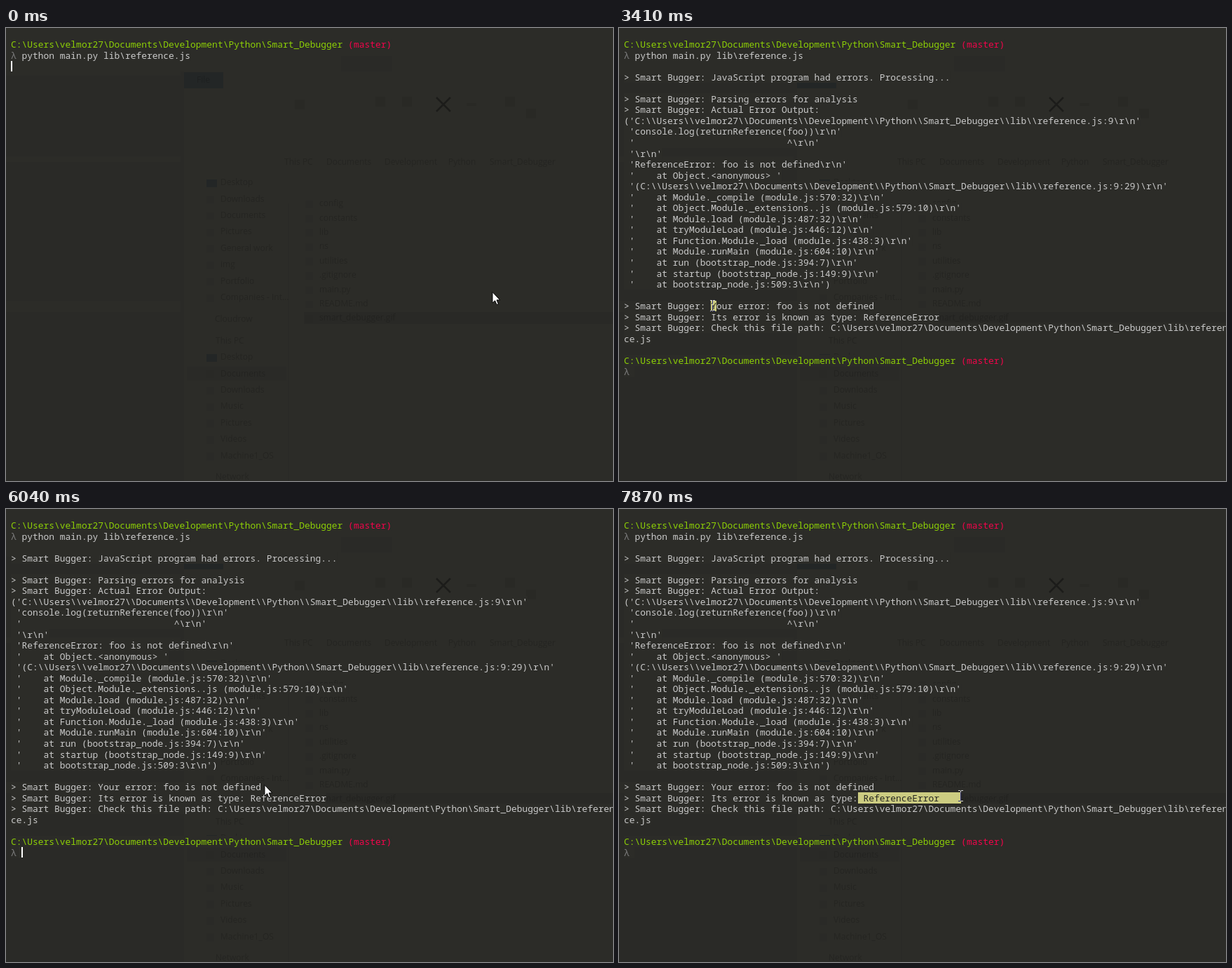
Recreate the animation shown at these times as an HTML page with a canvas. Size 866x646 px, loop 8 s.

```html
<!DOCTYPE html>
<html lang="en">
<head>
<meta charset="utf-8">
<title>Terminal session</title>
<style>
html, body { margin: 0; width: 100%; height: 100%; overflow: hidden; background: #2c2c28; }
canvas { display: block; }
</style>
</head>
<body>
<canvas id="stage" width="866" height="646"></canvas>
<script>
const W = 866, H = 646, LOOP = 8000;
const LEFT = 7, TOP = 15.5, CELL = 7.76, ROW = 15.55, COLS = 111;
const BG = '#2c2c28', TEXT = '#cacaca', GREY = '#7c7c7c', GREEN = '#8dd006', RED = '#f3044b';
const MARK = '#cccc81', MARK_TEXT = '#272822';
const ctx = document.getElementById('stage').getContext('2d');

const raw = String.raw;
const folder = raw`C:\Users\velmor27\Documents\Development\Python\Smart_Debugger`;
const escaped = folder.replaceAll('\\', '\\\\') + raw`\\lib\\reference.js:9`;
const say = text => '> Smart Bugger: ' + text;
const at = text => ` '    at ${text}`;
const prompt = [[folder, GREEN], [' (master)', RED]];

const startRows = [prompt, [['λ', GREY], [raw` python main.py lib\reference.js`, TEXT]]];
const output = [
  '',
  say('JavaScript program had errors. Processing...'),
  '',
  say('Parsing errors for analysis'),
  say('Actual Error Output:'),
  `('${escaped}` + raw`\r\n'`,
  raw` 'console.log(returnReference(foo))\r\n'`,
  " '" + ' '.repeat(28) + raw`^\r\n'`,
  raw` '\r\n'`,
  raw` 'ReferenceError: foo is not defined\r\n'`,
  at("Object.<anonymous> '"),
  ` '(${escaped}` + raw`:29)\r\n'`,
  at(raw`Module._compile (module.js:570:32)\r\n'`),
  at(raw`Object.Module._extensions..js (module.js:579:10)\r\n'`),
  at(raw`Module.load (module.js:487:32)\r\n'`),
  at(raw`tryModuleLoad (module.js:446:12)\r\n'`),
  at(raw`Function.Module._load (module.js:438:3)\r\n'`),
  at(raw`Module.runMain (module.js:604:10)\r\n'`),
  at(raw`run (bootstrap_node.js:394:7)\r\n'`),
  at(raw`startup (bootstrap_node.js:149:9)\r\n'`),
  at(raw`bootstrap_node.js:509:3\r\n')`),
  '',
  say('Your error: foo is not defined'),
  say('Its error is known as type: ReferenceError'),
  ...say(`Check this file path: ${folder}` + raw`\lib\reference.js`).match(/.{1,111}/g),
  ''
].map(line => [[line, TEXT]]);
const endRows = [prompt, [['λ ', GREY]]];

// Pointer: time, x, y, and the [row, column] where a drag started.
const first = [24, 16], second = [25, 43];
const pointer = [
  [0, 694, 376], [2730, 494, 395], [2880, 133, 391],
  [3410, 133, 396, first], [3540, 165, 395, first], [3670, 215, 392, first],
  [3800, 244, 387, first], [4060, 290, 392, first], [4190, 340, 392, first],
  [4450, 352, 393, first], [4580, 363, 394, first], [4710, 371, 395, first],
  [6040, 369, 393], [6300, 366, 396], [6430, 362, 400], [6560, 358, 403],
  [6680, 355, 405], [6830, 352, 407], [6960, 350, 408], [7220, 348, 409],
  [7350, 345, 412, second], [7480, 395, 417, second], [7610, 440, 426, second],
  [7740, 468, 414, second], [7870, 487, 409, second]
];

// Text cursor: time, row, column; no row means hidden.
const caret = [
  [0, 2, 0], [430], [960, 2, 0], [1490], [1920, 2, 0], [2190, 28, 0], [2320, 29, 0],
  [2880, 30, 2], [3410], [6040, 30, 2], [6560], [7090, 30, 2], [7350]
];

const current = (list, t) => list.findLast(step => step[0] <= t);
const colX = col => LEFT + col * CELL;
const rowY = row => Math.round(TOP + row * ROW);

function rect(color, x, y, w, h) {
  ctx.fillStyle = color;
  ctx.fillRect(x, y, w, h);
}

// Faint file window showing through the terminal.
function drawBackdrop() {
  rect(BG, 0, 0, W, H);
  const shade = 'rgba(0,0,0,.035)', dim = 'rgba(0,0,0,.17)', navy = 'rgba(14,24,34,.3)';
  rect(shade, 0, 68, 249, 115);
  rect(shade, 0, 191, 249, 198);
  rect(shade, 0, 405, 249, 241);
  rect(shade, 249, 62, 5, 584);
  rect(shade, 478, 40, 73, 22);
  rect(shade, 402, 250, 2, 396);
  rect(shade, 258, 483, 142, 20);
  rect('rgba(0,0,0,.06)', 425, 405, 441, 17);
  rect(navy, 254, 63, 56, 23);
  ctx.font = '12px "Open Sans", "Noto Sans", sans-serif';
  ctx.textBaseline = 'middle';
  const label = (text, x, y) => { ctx.fillStyle = dim; ctx.fillText(text, x, y); };
  const list = (names, x, y, step) => names.forEach((name, i) => {
    label(name, x, y + i * step);
    rect(name === 'Desktop' ? navy : shade, x - 20, y + i * step - 5, name === 'Desktop' ? 15 : 11, 11);
  });
  list(['Desktop', 'Downloads', 'Documents', 'Pictures', 'General work', 'img', 'Portfolio',
    'Companies - Int...'], 306, 221, 23.4);
  list(['Desktop', 'Documents', 'Downloads', 'Music', 'Pictures', 'Videos', 'Machine1_OS'], 306, 470, 23.4);
  list(['config', 'constants', 'lib', 'ns', 'utilities', '.gitignore', 'main.py', 'README.md',
    'smart_debugger.gif'], 447, 251, 20.4);
  label('Cloudrow', 298, 416);
  label('This PC', 299, 447);
  label('Network', 299, 641);
  label('File', 272, 75);
  [['This PC', 397], ['Documents', 457], ['Development', 540], ['Python', 631], ['Smart_Debugger', 690]]
    .forEach(([name, x]) => label(name, x, 192));
  [[412, 102], [527, 98], [565, 98], [657, 107], [712, 98], [742, 115]]
    .forEach(([x, y]) => rect('rgba(0,0,0,.08)', x, y, 14, y === 107 ? 4 : 14));
  ctx.strokeStyle = 'rgba(0,0,0,.35)';
  ctx.lineWidth = 2.5;
  ctx.beginPath();
  ctx.moveTo(614, 99); ctx.lineTo(634, 119);
  ctx.moveTo(634, 99); ctx.lineTo(614, 119);
  ctx.stroke();
}

// Inclusive cell range between the drag start and the pointer.
function selection([, x, y, anchor]) {
  if (!anchor) return [1, 0];
  const start = anchor[0] * COLS + anchor[1];
  const end = Math.floor((y - TOP) / ROW) * COLS + Math.floor((x - LEFT) / CELL);
  return [Math.min(start, end), Math.max(start, end)];
}

function drawRow(parts, row, [from, to]) {
  const y = rowY(row), h = rowY(row + 1) - y;
  const length = parts.reduce((sum, [text]) => sum + text.length, 0);
  if (length) rect(BG, LEFT, y, length * CELL, h);
  const a = Math.max(from - row * COLS, 0), b = Math.min(to - row * COLS, COLS - 1);
  if (a <= b) {
    const left = Math.round(colX(a));
    rect(MARK, left, y, (b === COLS - 1 ? W : Math.round(colX(b + 1))) - left, h);
  }
  let col = 0;
  for (const [text, color] of parts) {
    for (const char of text) {
      ctx.fillStyle = col >= a && col <= b ? MARK_TEXT : color;
      if (char !== ' ') ctx.fillText(char, colX(col), Math.round(TOP + row * ROW + 12.5));
      col++;
    }
  }
}

function drawArrow(x, y) {
  const shape = new Path2D('M.5 .5V16.2L4.1 12.8L6.6 18.5L9 17.5L6.6 11.9H11.3Z');
  ctx.save();
  ctx.translate(x - 0.5, y);
  ctx.fillStyle = '#fff';
  ctx.strokeStyle = '#000';
  ctx.lineWidth = 1;
  ctx.fill(shape);
  ctx.stroke(shape);
  ctx.restore();
}

function drawBeam(x, y) {
  ctx.globalCompositeOperation = 'difference';
  rect('#fff', x, y - 7, 1, 14);
  for (const edge of [y - 8, y + 7]) {
    rect('#fff', x - 3, edge, 3, 1);
    rect('#fff', x + 1, edge, 3, 1);
  }
  ctx.globalCompositeOperation = 'source-over';
}

function draw(t) {
  const mouse = current(pointer, t), range = selection(mouse);
  const [, row, col] = current(caret, t);
  const rows = [...startRows, ...(t >= 2190 ? output : []), ...(t >= 2880 ? endRows : [])];
  drawBackdrop();
  ctx.font = '12.93px "Noto Sans Mono", "DejaVu Sans Mono", monospace';
  ctx.textBaseline = 'alphabetic';
  rows.forEach((parts, i) => drawRow(parts, i, range));
  if (row !== undefined) rect('#fff', Math.floor(colX(col)), rowY(row), 2, 15);
  (mouse[3] ? drawBeam : drawArrow)(mouse[1], mouse[2]);
}

function tick() {
  draw(performance.now() % LOOP);
  requestAnimationFrame(tick);
}
tick();
</script>
</body>
</html>
```
